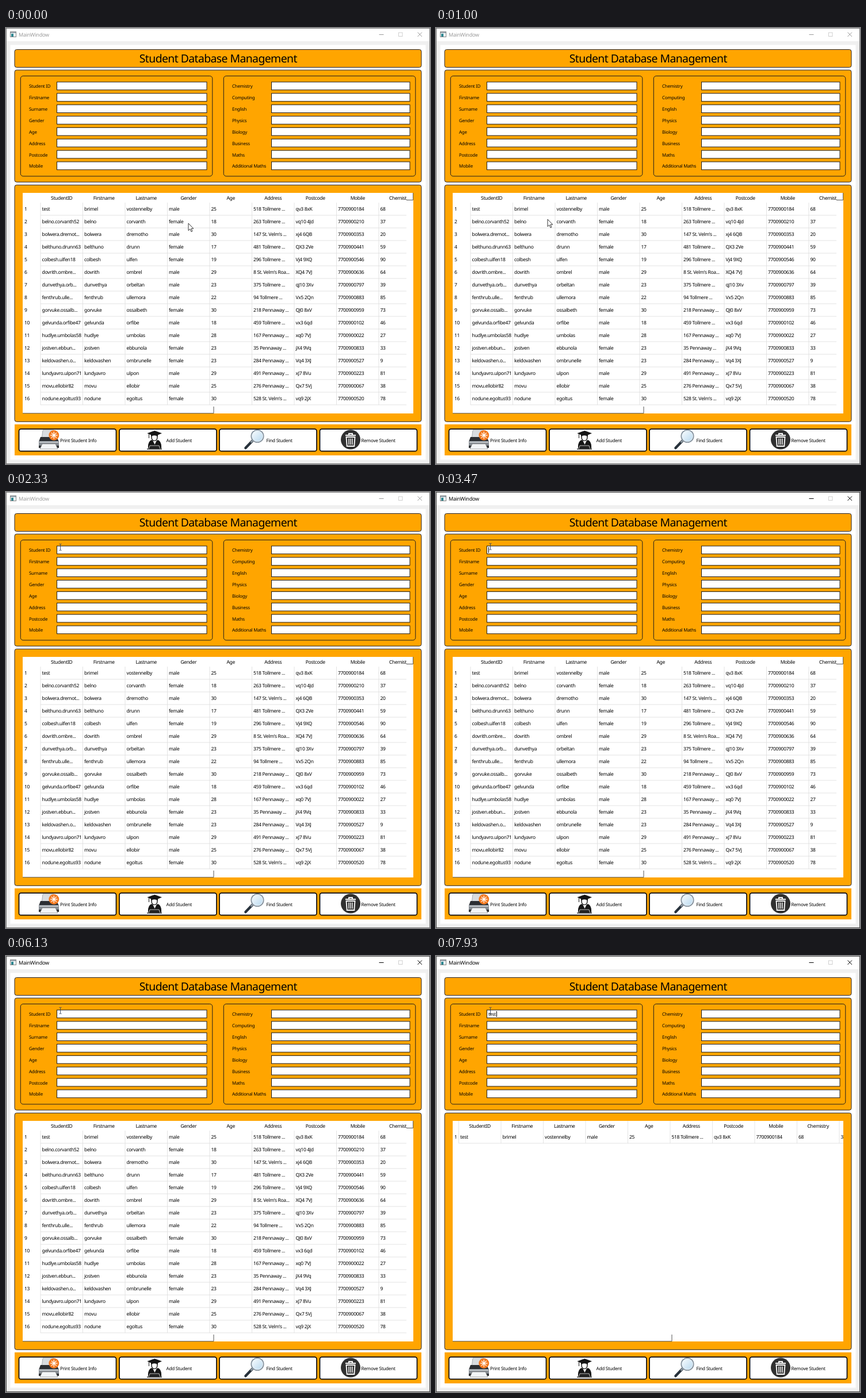
These frames come from a looping animation (737 px wide and 759 px high, 8 s). An HTML page:

```html
<!DOCTYPE html>
<html lang="en">
<head>
<meta charset="utf-8">
<title>MainWindow</title>
<style>
html, body { margin: 0; width: 100%; height: 100%; overflow: hidden; background: #f0f0f0; }
svg { display: block; }
text { font-family: "Noto Sans", "Open Sans", sans-serif; letter-spacing: -.03em; text-rendering: geometricPrecision; white-space: pre; }
.cell { font-size: 8.5px; letter-spacing: -.04em; }
.label { font-size: 7.9px; }
.button { font-size: 8.1px; }
.mid { text-anchor: middle; }
</style>
</head>
<body>
<svg id="stage" width="100%" height="100%" viewBox="0 0 737 759"></svg>
<script>
const LOOP = 8000, COL = 73.5, ROW = 22;
const ORANGE = '#ffa500', INK = '#1c1c1c', GRID = '#dcdcdc';
const stage = document.getElementById('stage');

const rect = (x, y, w, h, attrs = '') => `<rect x="${x}" y="${y}" width="${w}" height="${h}" ${attrs}/>`;
const text = (x, y, s, cls = 'cell', attrs = '') => `<text x="${x}" y="${y}" class="${cls}" ${attrs}>${s}</text>`;
const path = (d, attrs = '') => `<path d="${d}" ${attrs}/>`;

const heads = 'StudentID Firstname Lastname Gender Age Address Postcode Mobile Chemistry'.split(' ');
const students = `test|brimel|vostennelby|male|25|518 Tollmere ...|qv3 8xK|7700900184|68
belno.corvanth52|belno|corvanth|female|18|263 Tollmere ...|vq10 4Jd|7700900210|37
bolwera.dremot...|bolwera|dremotho|male|30|147 St. Velm's ...|xj4 6QB|7700900353|20
belthuno.drunn63|belthuno|drunn|female|17|481 Tollmere ...|QX3 2Ve|7700900441|59
colbesh.ulfen18|colbesh|ulfen|female|19|296 Tollmere ...|Vj4 9XQ|7700900546|90
dovrith.ombre...|dovrith|ombrel|male|29|8 St. Velm's Roa...|XQ4 7VJ|7700900636|64
dunvethya.orb...|dunvethya|orbeltan|male|23|375 Tollmere ...|qJ10 3Xv|7700900797|39
fenthrub.ulle...|fenthrub|ullemora|male|22|94 Tollmere ...|Vx5 2Qn|7700900883|85
gorvuke.ossalb...|gorvuke|ossalbeth|female|30|218 Pennaway ...|QJ0 8xV|7700900959|73
gelvunda.orfibe47|gelvunda|orfibe|male|18|459 Tollmere ...|vx3 6qd|7700900102|46
hudlye.umbolas58|hudlye|umbolas|male|28|167 Pennaway ...|xq0 7VJ|7700900022|27
jostven.ebbun...|jostven|ebbunola|female|23|35 Pennaway ...|jX4 9Vq|7700900833|33
keldovashen.o...|keldovashen|ombrunelle|female|23|284 Pennaway ...|Vq4 3XJ|7700900527|9
lundyavro.ulpon71|lundyavro|ulpon|male|29|491 Pennaway ...|xJ7 8Vu|7700900223|81
movu.ellobir82|movu|ellobir|male|25|276 Pennaway ...|Qx7 5Vj|7700900067|38
nodune.egoltus93|nodune|egoltus|female|30|528 St. Velm's ...|vq9 2jX|7700900520|78`
  .split('\n').map(line => line.split('|'));

// Table in its own viewport; x0 is the width of the row-number strip.
function table(id, rows, x0, width, bar) {
  const cols = Math.ceil((width - x0) / COL), bottom = Math.min(17 + rows.length * ROW, 370);
  let s = '', grid = '';
  for (let c = 0; c < cols; c++) {
    const x = x0 + c * COL;
    grid += `M${x} 17V${bottom}`;
    if (heads[c]) s += text(x + COL / 2, 12, heads[c], 'cell mid');
  }
  rows.forEach((row, r) => {
    const y = 17 + r * ROW;
    grid += `M${x0} ${y + ROW}H${width}`;
    s += text(3, y + 14, r + 1);
    row.forEach((v, c) => { s += text(x0 + c * COL + 2.5, y + 14, v); });
  });
  const head = rows.length === 1
    ? path(Array.from({ length: cols }, (_, c) => `M${x0 + c * COL} 0V17`).join(''), 'stroke="#e6e6e6"') : '';
  return `<g id="${id}"><svg x="29" y="287" width="${width}" height="372">` +
    head + path(grid, `stroke="${GRID}" stroke-width=".8" fill="none"`) + s + '</svg>' +
    path(`M29 670.7H${bar}V659`, 'fill="none" stroke="#555"') + '</g>';
}

function form(x, fieldX, fieldW, names) {
  return rect(x, 83.5, 333.5, 174.5, `rx="4.5" fill="none" stroke="${INK}"`) +
    names.map((name, i) => {
      const y = 94 + i * 19.85;
      return text(x + 14.7, y + 10.4, name, 'label') +
        rect(fieldX + .5, y, fieldW, 13.8, `fill="#fff" stroke="${INK}"`);
    }).join('');
}

const panel = (y, h) => rect(15, y, 707, h, `rx="3.5" fill="${ORANGE}" stroke="#26262e"`);

function printer() {
  let rays = '';
  for (let i = 0; i < 8; i++) rays += `<path d="M83.3 709V702.8" transform="rotate(${i * 45} 83.3 709)"/>`;
  return path('M64 700H83L86 715H62Z', 'fill="#d9dde0" stroke="#8c9296" stroke-width=".7"') +
    path('M60 712H88L92 720V731H57V720Z', 'fill="#2c2f33"') +
    rect(57, 719, 35, 8, 'fill="#868c92"') + rect(58, 720, 33, 2, 'fill="#c3c8cc"') +
    path('M63 724H86L90 733H59Z', 'fill="#f3f5f6" stroke="#777" stroke-width=".7"') +
    '<circle cx="83.3" cy="709" r="9" fill="#f47a20"/>' +
    `<g stroke="#fff" stroke-width="1.3">${rays}</g>`;
}

function graduate() {
  return path('M247 732Q246 720 253 717L258 721L264 717Q271 720 270 732Z', 'fill="#151515"') +
    '<ellipse cx="258" cy="712.5" rx="5" ry="6.2" fill="#fff" stroke="#151515" stroke-width="1.4"/>' +
    path('M245.5 705.5L258.5 701L271 705.5L264 708.4V711Q258 707.5 252 711V708.4Z', 'fill="#151515"') +
    path('M248.5 706V714', 'stroke="#151515"') +
    path('M255 719L258.5 726L262 719', 'fill="#fff" stroke="#151515"') +
    path('M250 727H266L268 733H248Z', 'fill="#222" stroke="#fff" stroke-width=".7"') +
    path('M245 733H271', 'stroke="#151515" stroke-width="1.3"');
}

function magnifier() {
  return path('M428 719L416.5 731', 'stroke="#28323c" stroke-width="4.6" stroke-linecap="round"') +
    path('M430 717L425.5 721.5', 'stroke="#8f9aa4" stroke-width="3"') +
    '<circle cx="437" cy="710.5" r="10.7" fill="#d9ecf8" stroke="#87939e" stroke-width="1.8"/>' +
    '<circle cx="437" cy="710.5" r="9.2" fill="url(#lens)" stroke="#eef3f6" stroke-width=".7"/>';
}

function bin() {
  return '<circle cx="599" cy="716.5" r="17" fill="#303030"/>' +
    path('M590 709H608M596 708.5V706H602V708.5', 'fill="none" stroke="#fff" stroke-width="1.8"') +
    path('M591.5 712H606.5L605.3 728H592.7Z', 'fill="none" stroke="#fff" stroke-width="1.8"') +
    path('M596 714.5V725.5M599 714.5V725.5M602 714.5V725.5', 'stroke="#fff" stroke-width="1.4"');
}

const buttons = [
  [22.5, 94, 'Print Student Info', printer],
  [197, 278.5, 'Add Student', graduate],
  [371, 452.5, 'Find Student', magnifier],
  [545.5, 617.5, 'Remove Student', bin]
].map(([x, tx, name, icon]) =>
  rect(x, 698.2, 169, 38.5, 'rx="3.5" fill="#fff" stroke="#080808" stroke-width="1.7"') +
  icon() + text(tx, 720.6, name, 'button')).join('');

stage.innerHTML =
  `<defs><linearGradient id="lens" x2="1" y2="1"><stop stop-color="#f8fcff"/><stop offset="1" stop-color="#b9d9ee"/></linearGradient></defs>` +
  rect(0, 0, 737, 759, 'fill="#f0f0f0"') + rect(0, 0, 737, 23, 'fill="#fff"') +
  rect(7.5, 29.5, 722, 722, 'fill="#fff"') +
  rect(.5, .5, 736, 758, 'id="edge" fill="none"') +
  rect(7.5, 6.5, 10, 9, 'fill="#f4f6f7" stroke="#888"') + rect(8, 7, 9, 2, 'fill="#9aa8b2"') +
  rect(9, 10, 4, 5, 'fill="#2d8791"') +
  text(22, 15, 'MainWindow', 'caption', 'id="caption" font-size="9.05"') +
  path('M648.5 11.5H656.5M715.5 7.5L723 15M723 7.5L715.5 15', 'id="controls" fill="none"') +
  rect(682.5, 8, 6.5, 6.5, 'fill="none" stroke="#cfcfcf"') +
  panel(37.5, 31) + text(368.8, 60.2, 'Student Database Management', 'mid', 'font-size="19.4"') +
  panel(73.2, 195) +
  form(25.3, 88, 260.5, ['Student ID', 'Firstname', 'Surname', 'Gender', 'Age', 'Address', 'Postcode', 'Mobile']) +
  form(378.3, 461, 240.5, ['Chemistry', 'Computing', 'English', 'Physics', 'Biology', 'Business', 'Maths', 'Additional Maths']) +
  panel(273.3, 412) + rect(29, 287, 679, 384, 'fill="#fff"') +
  table('all', students, 31, 667, 361) +
  `<g id="scroll">${path('M696 299.5H707.6V287', 'fill="none" stroke="#555"')}</g>` +
  table('found', [[...students[0], '3']], 10.5, 679, 410) +
  rect(15, 690, 707, 54, `fill="${ORANGE}"`) + buttons +
  text(91, 104.3, '', 'label', 'id="typed"') +
  path('M0 96V106', 'id="caret" stroke="#000"') +
  path('M0 0V12.6L2.9 9.9L5 14.6L7 13.7L4.9 9.2H8.8Z', 'id="arrow" fill="#fff" stroke="#111" stroke-width=".85"') +
  path('M-2 .5H-.6L0 1L.6 .5H2M0 1V11M-2 11.5H-.6L0 11L.6 11.5H2', 'id="beam" fill="none" stroke="#30405a" stroke-width=".9"');

const el = {};
stage.querySelectorAll('[id]').forEach(e => { el[e.id] = e; });
const set = (id, name, value) => el[id].setAttribute(name, value);
const show = (id, on) => set(id, 'visibility', on ? 'visible' : 'hidden');

// Pointer path: time, x, y
const route = [[0, 317, 340], [450, 268, 362], [870, 216, 369], [1000, 194, 333], [1300, 132, 196], [1530, 97, 124], [1730, 101, 109]];

function pointer(t) {
  const s = Math.floor((t + 4) * .015) / .015;
  const i = route.findIndex(p => p[0] > s);
  if (i < 0) return route[route.length - 1].slice(1);
  const [a, b] = [route[i - 1], route[i]], k = (s - a[0]) / (b[0] - a[0]);
  return [a[1] + (b[1] - a[1]) * k, a[2] + (b[2] - a[2]) * k];
}

function draw(t) {
  const active = t >= 2400, found = t >= 6270;
  set('edge', 'stroke', active ? '#484848' : '#777');
  set('caption', 'fill', active ? '#000' : '#999');
  set('controls', 'stroke', active ? '#000' : '#999');

  show('all', !found);
  show('scroll', !found);
  show('found', found);

  const typed = 'test'.slice(0, t < 6270 ? 0 : t < 6470 ? 1 : t < 6800 ? 3 : 4);
  el.typed.textContent = typed;
  const caretX = [91.5, 94, 98, 102.5, 105.5][typed.length];
  const flips = [2930, 3470, 4000, 4530, 5070, 5600, 6130, 6270, 7400, 7930].filter(f => t >= f).length;
  set('caret', 'transform', `translate(${caretX} 0)`);
  show('caret', active && flips % 2 === 0);

  const [x, y] = pointer(t);
  set('arrow', 'transform', `translate(${x.toFixed(1)} ${y.toFixed(1)})`);
  show('arrow', t < 1800);
  set('beam', 'transform', `translate(94.5 ${t < 3130 ? 90 : 89})`);
  show('beam', t >= 2200);
}

const start = performance.now();
function tick(now) {
  draw(Math.max(0, now - start) % LOOP);
  requestAnimationFrame(tick);
}
draw(0);
requestAnimationFrame(tick);
</script>
</body>
</html>
```
